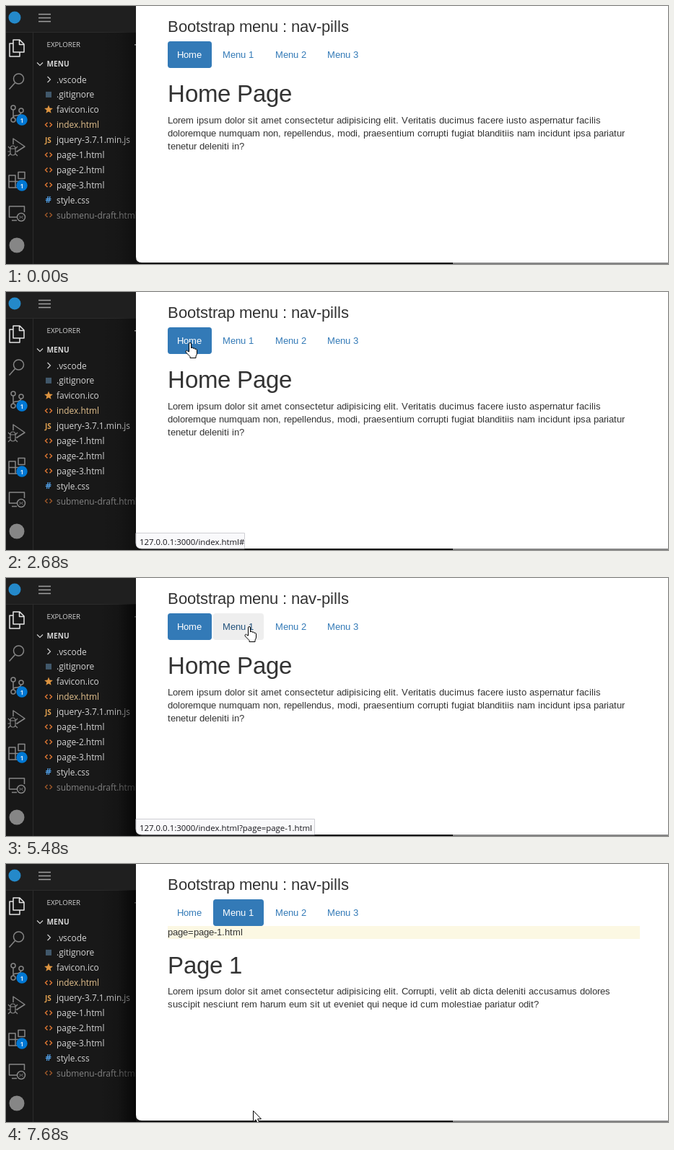
An HTML page that plays this animation: 917 by 358 pixels, repeating every 8 s.

```html
<!DOCTYPE html>
<html lang="en">
<head>
<meta charset="utf-8">
<title>Bootstrap menu</title>
<style>
html, body { margin: 0; width: 100%; height: 100%; overflow: hidden; background: #181818; }
svg { display: block; width: 917px; height: 358px; }
text { white-space: pre; }
.page { font: 13px "Liberation Sans", Arial, sans-serif; fill: #333; }
.page .title { font-size: 22px; }
.page .heading { font-size: 33px; }
.ui { font: 11.9px "Open Sans", "Noto Sans", sans-serif; fill: #d4d4d4; }
.icon { fill: none; stroke: #868686; stroke-width: 1.5; stroke-linejoin: round; }
.status { font: 11.4px "Open Sans", "Noto Sans", sans-serif; fill: #15141a; }
.cursor path { fill: #fff; stroke: #000; stroke-linejoin: round; }
</style>
</head>
<body>
<svg viewBox="0 0 917 358">
  <defs>
    <linearGradient id="shade">
      <stop offset="0" stop-opacity="0"/>
      <stop offset=".5" stop-opacity=".15"/>
      <stop offset="1" stop-opacity=".7"/>
    </linearGradient>
  </defs>
  <rect width="917" height="358" fill="#181818"/>
  <rect width="180" height="36" fill="#1f1f1f"/>
  <path d="M0 36.5H180M37.5 37V358" stroke="#2b2b2b"/>
  <circle cx="12" cy="16" r="8.5" fill="#2489ca"/>
  <path d="M45 11.5H62M45 16.5H62M45 21.5H62" stroke="#a0a0a0" stroke-width="1.5"/>

  <g class="icon">
    <path d="M10 47H19L25 53V64H10ZM18.500 47V53.500H25M10 52H5V70H19V64.500" stroke="#e4e4e4"/>
    <circle cx="17.500" cy="101" r="7"/><path d="M12.500 106.500L4.500 115.500"/>
    <circle cx="10" cy="141" r="3"/><circle cx="21" cy="145" r="3"/><circle cx="10" cy="158" r="3"/>
    <path d="M10 144V155M21 148Q20 152 14 152Q10 152 10 155"/>
    <path d="M10 192V184L26 195L15 202"/>
    <path d="M6 198Q6 194 9.500 194T13 198V203Q13 207 9.500 207T6 203ZM6 198H13M3 195L6 198M16 195L13 198M2.500 202H6M13 202H16.500M3 208L6 205M16 208L13 205" stroke-width="1.200"/>
    <path d="M4 235H13V252H4ZM4 243.500H22V252H13M17 230.500H26V239.500H17Z"/>
    <path d="M15 293H4.500V278H25.500V286M8 297.500H15"/>
    <circle cx="21" cy="293" r="5.500"/><path d="M18.500 291L20.500 293L18.500 295M23.500 291L21.500 293L23.500 295" stroke-width="1"/>
  </g>
  <circle cx="15" cy="332" r="10.500" fill="#868686"/>
  <g id="badges"></g>

  <g class="ui">
    <text x="56.500" y="57" font-size="9.700">EXPLORER</text>
    <text x="56.500" y="84" font-size="10.100" font-weight="700">MENU</text>
    <path d="M43 78.500L47 82.500L51 78.500M57.500 98L61.500 102L57.500 106" fill="none" stroke="#ccc" stroke-width="1.200"/>
    <rect x="178" y="53" width="2" height="1.500"/>
    <g id="files"></g>
  </g>

  <rect id="shadow" x="130" y="36" width="50" height="322" fill="url(#shade)"/>
  <rect x="180" y="356" width="439" height="2" fill="#101010"/>
  <rect x="619" y="356" width="298" height="2" fill="#858585"/>
  <path d="M917 0H180V348Q180 356 188 356H917Z" fill="#fff"/>

  <g class="page">
    <text class="title" x="224" y="36">Bootstrap menu : nav-pills</text>
    <g id="pills"></g>
    <g id="home">
      <text class="heading" x="224" y="133">Home Page</text>
      <text x="224" y="163">Lorem ipsum dolor sit amet consectetur adipisicing elit. Veritatis ducimus facere iusto aspernatur facilis</text>
      <text x="224" y="181">doloremque numquam non, repellendus, modi, praesentium corrupti fugiat blanditiis nam incidunt ipsa pariatur</text>
      <text x="224" y="199">tenetur deleniti in?</text>
    </g>
    <g id="first">
      <rect x="224" y="86" width="654" height="18" fill="#fcf8e3"/>
      <text x="224" y="99">page=page-1.html</text>
      <text class="heading" x="224" y="152">Page 1</text>
      <text x="224" y="181">Lorem ipsum dolor sit amet consectetur adipisicing elit. Corrupti, velit ab dicta deleniti accusamus dolores</text>
      <text x="224" y="199">suscipit nesciunt rem harum eum sit ut eveniet qui neque id cum molestiae pariatur odit?</text>
    </g>
  </g>

  <g id="status" class="status">
    <path id="statusBox" fill="#f9f9fb" stroke="#cfcfd4"/>
    <text id="statusText" x="185" y="351"></text>
  </g>

  <g id="cursor" class="cursor">
    <path id="arrow" d="M.5 .5V16L4 12.800L6.500 18.300L9 17.200L6.600 11.800H11.500Z"/>
    <path id="hand" transform="translate(-6.500 0)" d="M5 13V2Q5 .5 6.500 .5T8 2V8Q8 7 9.500 7T11 8.500Q11 8 12.200 8T13.500 9.500Q13.500 9 14.800 9.200T16 11V15Q16 17 14.500 19V21.500H6.500V19.500L1 14Q0 12.500 1 11.500T3.200 12Z"/>
  </g>
</svg>
<script>
const LOOP = 8000, STEP = 65;
const LINK_SWITCH = 3950, WINDOW_FOCUS = 5280, PAGE_SWITCH = 5540;

const byId = id => document.getElementById(id);

function add(parent, tag, attrs, text = '') {
  const el = document.createElementNS('http://www.w3.org/2000/svg', tag);
  for (const name in attrs) el.setAttribute(name, attrs[name]);
  el.textContent = text;
  return parent.appendChild(el);
}

for (const y of [158, 249]) {
  add(byId('badges'), 'circle', { cx: 22, cy: y, r: 7.7, fill: '#0078d4' });
  add(byId('badges'), 'text', { class: 'ui', x: 22, y: y + 3.5, 'text-anchor': 'middle',
    style: 'font-size:9px;font-weight:600;fill:#fff' }, '1');
}

const fileIcons = {
  html: y => add(byId('files'), 'path', { d: `M57.500 ${y - 3}L54.500 ${y}L57.500 ${y + 3}M60.500 ${y - 3}L63.500 ${y}L60.500 ${y + 3}`,
    fill: 'none', stroke: '#e37933', 'stroke-width': 1.4 }),
  gitignore: y => add(byId('files'), 'rect', { x: 55, y: y - 4, width: 8, height: 8, fill: '#41586b' }),
  ico: y => {
    const points = Array.from({ length: 10 }, (_, i) => {
      const a = i * Math.PI / 5, r = i % 2 ? 2.7 : 6.2;
      return [59 + r * Math.sin(a), y - r * Math.cos(a)];
    });
    add(byId('files'), 'polygon', { points: points.join(' '), fill: '#dd9440' });
  },
  js: y => glyph('JS', 54, y, '#e0a050', 10),
  css: y => glyph('#', 54.5, y, '#4f9be0', 13)
};

function glyph(text, x, y, color, size) {
  add(byId('files'), 'text', { x, y: y + 4, style: `font-size:${size}px;font-weight:700;fill:${color}` }, text);
}

const nameColors = { 'index.html': '#e2c08d', 'submenu-draft.html': '#858585' };

['.vscode', '.gitignore', 'favicon.ico', 'index.html', 'jquery-3.7.1.min.js', 'page-1.html',
 'page-2.html', 'page-3.html', 'style.css', 'submenu-draft.html'].forEach((name, i) => {
  const y = 102 + 20.9 * i;
  add(byId('files'), 'text', { x: 70, y: y + 4.5, fill: nameColors[name] || '#d4d4d4' }, name);
  const icon = fileIcons[name.split('.').pop()]?.(y);
  if (name.startsWith('submenu')) icon.setAttribute('opacity', 0.65);
});

const pills = [['Home', 224, 61], ['Menu 1', 287, 70], ['Menu 2', 360, 70], ['Menu 3', 432, 70]].map(([name, x, width]) => ({
  x, width,
  box: add(byId('pills'), 'rect', { x, y: 49, width, height: 37, rx: 3.7 }),
  label: add(byId('pills'), 'text', { x: x + 13, y: 72 }, name)
}));

// Page text has hinted glyphs: every advance is a whole number of pixels.
const measure = document.createElement('canvas').getContext('2d');
for (const el of document.querySelectorAll('.page text')) {
  const { fontSize, fontFamily } = getComputedStyle(el);
  measure.font = `${fontSize} ${fontFamily}`;
  let x = Number(el.getAttribute('x'));
  const starts = [...el.textContent].map(char => {
    const start = x;
    x += Math.round(measure.measureText(char).width);
    return start;
  });
  el.setAttribute('x', starts.join(' '));
}

// Pointer: spans of movement, and [time, x, y] waypoints.
const moves = [[200, 520], [1260, 2010], [2080, 2680], [3820, 4210], [7000, 7680]];
const path = [
  [200, 831, 340], [265, 815, 286], [330, 782, 238], [395, 746, 212], [460, 722, 234], [520, 714, 252],
  [1260, 694, 250], [1390, 570, 238], [1520, 448, 217], [1715, 343, 168], [1910, 279, 105], [2010, 266, 91],
  [2080, 261, 83], [2210, 257, 76], [2405, 255, 70], [2680, 255, 70],
  [3820, 287, 73], [3950, 318, 70], [4210, 337, 67],
  [7000, 337, 76], [7065, 338, 108], [7260, 340, 228], [7455, 342, 318], [7680, 342, 342]
];

const ramp = (t, from, to) => Math.min(1, Math.max(0, (t - from) / (to - from)));

function steppedTime(t) {
  const move = moves.filter(([start]) => start <= t).pop();
  if (!move) return 0;
  const [start, end] = move;
  return t >= end ? end : start + Math.floor((t - start) / STEP + 0.1) * STEP;
}

function pointerAt(t) {
  const next = path.findIndex(p => p[0] > t);
  if (next < 1) return path[path.length - 1].slice(1);
  const [t0, x0, y0] = path[next - 1], [t1, x1, y1] = path[next];
  const k = ramp(t, t0, t1);
  return [x0 + (x1 - x0) * k, y0 + (y1 - y0) * k].map(Math.round);
}

const show = (id, on) => byId(id).setAttribute('visibility', on ? 'visible' : 'hidden');

function render(t) {
  const time = steppedTime(t);
  const [x, y] = pointerAt(time);
  const onFirst = t >= PAGE_SWITCH;
  const hovered = y < 86 ? pills.findIndex(p => x > p.x && x < p.x + p.width) : -1;

  pills.forEach(({ box, label }, i) => {
    const active = i === Number(onFirst), hover = i === hovered;
    box.setAttribute('fill', active ? '#337ab7' : hover ? '#eee' : 'none');
    label.setAttribute('fill', active ? '#fff' : hover ? '#23527c' : '#337ab7');
  });
  show('home', !onFirst);
  show('first', onFirst);
  byId('shadow').setAttribute('opacity', t < WINDOW_FOCUS ? 0.5 : 1);

  const firstLink = t >= LINK_SWITCH;
  byId('statusBox').setAttribute('d', `M180 334.500H${firstLink ? 427.5 : 330.5}V356H188Q180 356 180 348Z`);
  byId('statusText').textContent = '127.0.0.1:3000/index.html' + (firstLink ? '?page=page-1.html' : '#');
  byId('status').setAttribute('opacity', ramp(time, 2480, 2680) - ramp(time, 7450, 7600));

  const visible = t >= 200, hand = hovered >= 0;
  byId('cursor').setAttribute('transform', `translate(${x} ${y})`);
  show('arrow', visible && !hand);
  show('hand', visible && hand);
}

function tick() {
  render(performance.now() % LOOP);
  requestAnimationFrame(tick);
}
tick();
</script>
</body>
</html>
```
